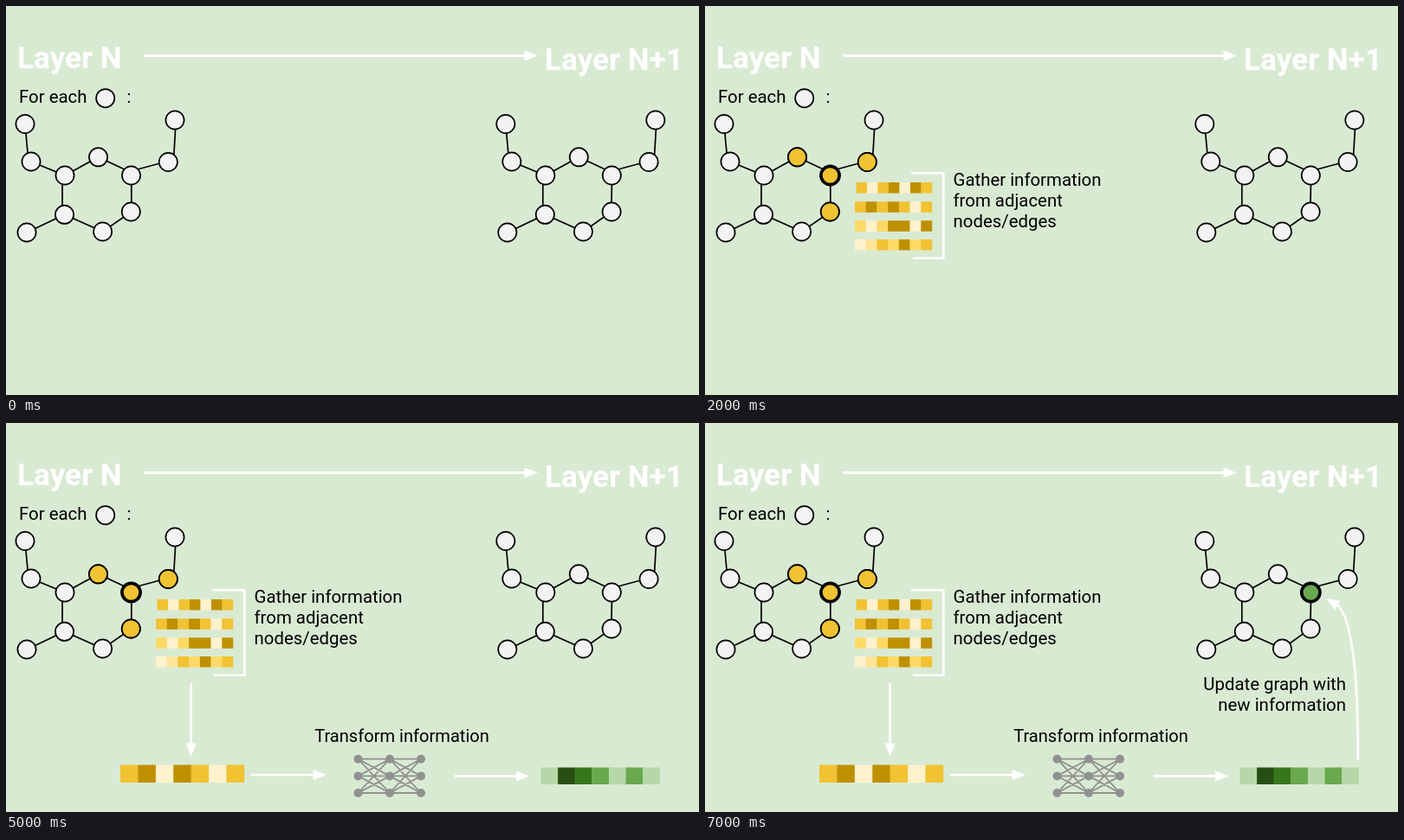
An HTML page that plays this animation: 800 by 450 pixels, repeating every 8000 ms.

```html
<!DOCTYPE html>
<html lang="en">
<head>
<meta charset="utf-8">
<title>Message passing between layers</title>
<style>
  html, body { margin: 0; width: 100%; height: 100%; overflow: hidden; background: #d9ead3; }
  svg { display: block; width: 800px; height: 450px; font: 20.4px Roboto, sans-serif; }
  .title { font-size: 35.2px; font-weight: 700; fill: #fff; }
</style>
</head>
<body>
<svg id="stage" viewBox="0 0 800 450"></svg>
<script>
const LOOP = 8000;
const YELLOW = '#f1c232';
const COLORS = {
  y: YELLOW, d: '#bf9000', c: '#fff2cc', m: '#ffd966', l: '#ffe599',
  1: '#b6d7a8', 2: '#6aa84f', 3: '#38761d', 4: '#274e13'
};
const NODES = {
  A: [22, 136.5], B: [29, 180], C: [68, 196], D: [106.5, 174.8], E: [144.5, 196], F: [187.3, 180.5],
  G: [195, 132], H: [144.3, 238], I: [111.6, 261], J: [67.5, 241.3], K: [24, 262]
};
const RIGHT = 554.8;

const node = ([x, y], fill = '#f3f3f3', width = 1.7) =>
  `<circle cx="${x}" cy="${y}" r="10.6" fill="${fill}" stroke="#000" stroke-width="${width}"/>`;

const text = (x, y, words, extra = '') => `<text x="${x}" y="${y}" ${extra}>${words}</text>`;

const stroke = (d, color = '#fff', width = 2.6) =>
  `<path d="${d}" fill="none" stroke="${color}" stroke-width="${width}"/>`;

const head = (x, y, angle) =>
  `<path d="M0 0L-15.5 -6V6Z" fill="#fff" transform="translate(${x} ${y}) rotate(${angle})"/>`;

function arrow(x1, y1, x2, y2, width) {
  const angle = Math.atan2(y2 - y1, x2 - x1);
  const endX = x2 - 14 * Math.cos(angle), endY = y2 - 14 * Math.sin(angle);
  return stroke(`M${x1} ${y1}L${endX} ${endY}`, '#fff', width) + head(x2, y2, angle * 180 / Math.PI);
}

function strip(x, y, width, height, cells) {
  const w = width / cells.length;
  return [...cells].map((key, i) =>
    `<rect x="${x + i * w}" y="${y}" width="${w + 0.2}" height="${height}" fill="${COLORS[key]}"/>`).join('');
}

function graph(dx) {
  const bonds = 'M22 137L25.5 175M29 180L68 196L106.5 174.8L141 191M148 190L187 179.5M193.5 178L196 135' +
    `M65 198V240M144.8 196L${dx ? 144 : 144.8} 238L111.6 261L67.5 241.3L24 262`;
  return `<g transform="translate(${dx})">${stroke(bonds, '#000', 1.7)}` +
    Object.values(NODES).map(p => node(p)).join('') + '</g>';
}

function network() {
  const columns = [406.5, 443, 479], rows = [388.7, 408.4, 428];
  let lines = '', dots = '';
  columns.forEach((x, i) => rows.forEach(y => {
    dots += `<circle cx="${x}" cy="${y}" r="5" fill="#919191"/>`;
    if (i < 2) rows.forEach(y2 => lines += `M${x} ${y}L${columns[i + 1]} ${y2}`);
  }));
  return stroke(lines, '#919191', 1.8) + dots;
}

// Each step appears at its time and stays until the loop restarts.
const steps = [
  [0, text(13, 71.5, 'Layer N', 'class="title"') + text(622, 73.5, 'Layer N+1', 'class="title"') +
    arrow(159, 57.5, 614, 57.5, 3) +
    text(15, 112, 'For each') + node([114.7, 106.7]) + text(139.5, 112, ':') +
    graph(0) + graph(RIGHT)],
  [1000, node(NODES.E, YELLOW, 3.6)],
  [2000, ['D', 'F', 'H'].map(k => node(NODES[k], YELLOW)).join('') +
    strip(174.5, 204, 87.5, 12.5, 'ycydcdy') +
    strip(173, 226.3, 89, 12.5, 'ydydycy') +
    strip(173, 248.3, 89, 12.5, 'mcmddcd') +
    strip(173, 270, 89, 12.5, 'clymdmy') +
    stroke('M238 193.2H275.2V291.8H240') +
    text(286.5, 208, 'Gather information') + text(286.5, 232, 'from adjacent') +
    text(286.5, 256, 'nodes/edges')],
  [3000, arrow(213.6, 301, 213.6, 386) + strip(132, 395.5, 143, 20.5, 'ydcdycy') +
    arrow(283, 407, 370, 407)],
  [4000, text(457, 369, 'Transform information', 'text-anchor="middle" font-size="20.1"') +
    network() + arrow(518, 408.4, 604.5, 408.4)],
  [5000, strip(617.5, 398.5, 137.3, 19.5, '1432121')],
  [6000, stroke('M753.7 390C754 300 748 222 728 209') + head(717, 203, 211) +
    text(740, 309, 'Update graph with', 'text-anchor="end"') +
    text(740, 333, 'new information', 'text-anchor="end"')],
  [7000, node([NODES.E[0] + RIGHT, NODES.E[1]], COLORS[2], 3.6)]
];

const stage = document.getElementById('stage');
stage.innerHTML = steps.map(([, content]) => `<g>${content}</g>`).join('');
const groups = [...stage.children];
const start = performance.now();

function draw() {
  const t = (performance.now() - start) % LOOP;
  groups.forEach((g, i) => g.style.display = t >= steps[i][0] ? '' : 'none');
  requestAnimationFrame(draw);
}
draw();
</script>
</body>
</html>
```
